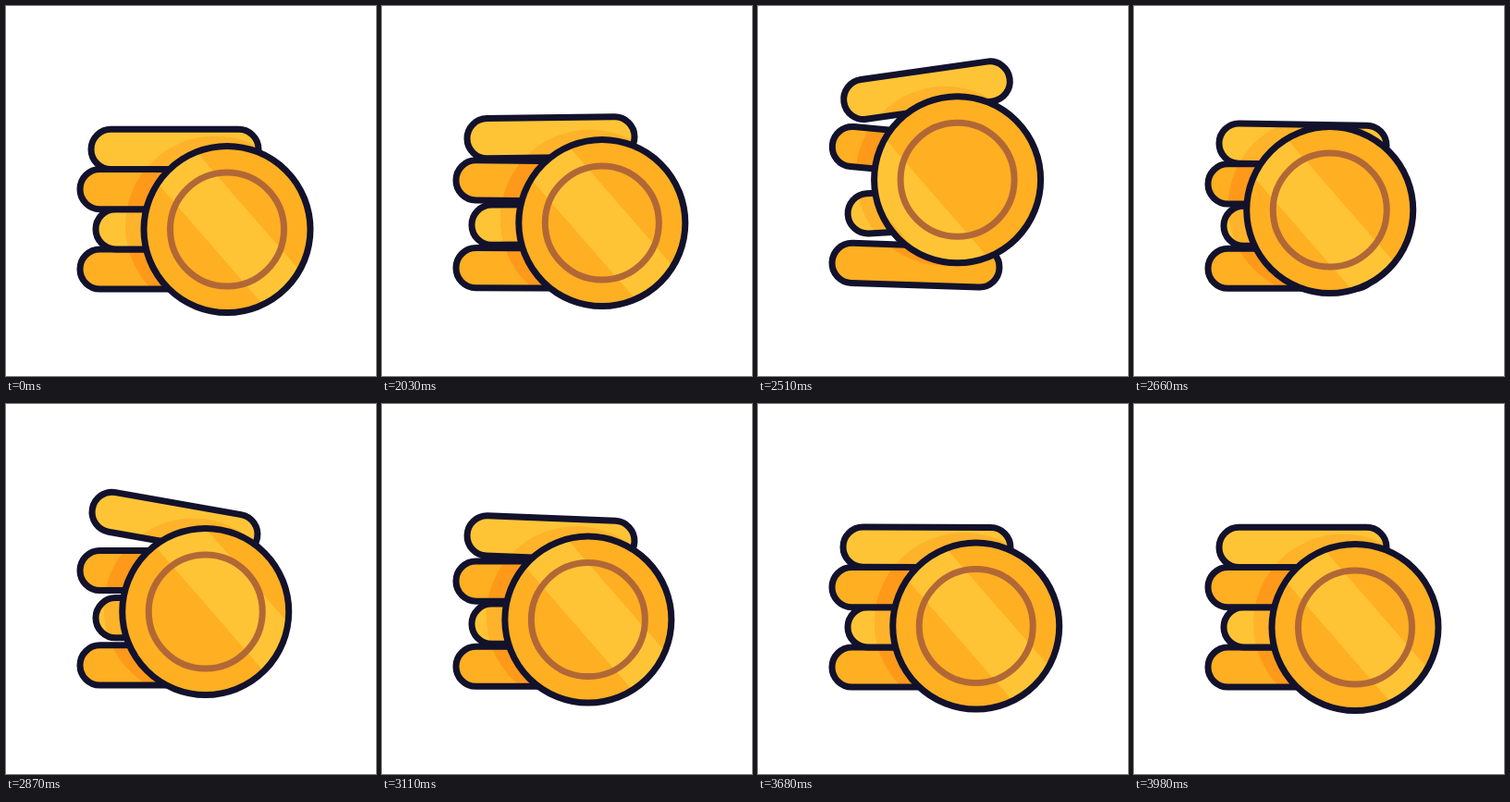
An HTML page with a canvas for the animation above (4.07 s loop, 400 by 400 pixels).

```html
<!DOCTYPE html>
<html lang="en">
<head>
<meta charset="utf-8">
<title>Bouncing coins</title>
<style>
html, body { margin: 0; width: 100%; height: 100%; overflow: hidden; background: #fff; }
canvas { display: block; width: 100%; height: 100%; }
</style>
</head>
<body>
<canvas id="stage" width="400" height="400"></canvas>
<script>
const ctx = document.getElementById('stage').getContext('2d');
const LOOP = 4070, STEP = 30, START = 2010, END = 3980;
const INK = '#12122d', LIGHT = '#ffc436', DARK = '#ffaf22', RING = '#b26836';
const LINE = 7, BAR_W = 181, BAR_H = 43.2, COIN_R = 90;
const REBOUNDS = [3165, 3600, 3930];
const RAD = Math.PI / 180;

// Four stacked bars, bottom to top: higher ones jump further and tilt more, alternating sides
const bars = [170.5, 187.5, 170.5, 182.5].map((x, i) => ({
  x, y: 284.5 - BAR_H * i,
  fill: i % 2 ? LIGHT : DARK,
  shade: i % 2 ? '#ffb32a' : '#ff991a',
  peak: 8 + 31 * i, air: 595 + i ** 3, bounce: [1, 0.26, 0.04, 0],
  swing: (i % 2 ? -1 : 1) * (4.8 + 3.8 * i),
  recoil: i === 3 ? 0.63 : 0
}));

const coin = {
  x: 239, y: 241.5, slide: 28,
  peak: 64, air: 714, bounce: [1, 0.3, 0.09, 0.03],
  swing: -78, recoil: 0.45
};

const easeOut = u => 1 - (1 - u) ** 1.5;

// Bounce number and height (0 to 1) of its parabola
function hop(part, t) {
  const land = [START, START + part.air, ...REBOUNDS];
  const n = land.findLastIndex(start => t >= start);
  if (n < 0 || n === land.length - 1) return { n: 0, arc: 0 };
  const u = (t - land[n]) / (land[n + 1] - land[n]);
  return { n, arc: 4 * u * (1 - u) };
}

function lift(part, t) {
  const { n, arc } = hop(part, t);
  return part.peak * part.bounce[n] * arc;
}

// One way during the jump, then a weakening recoil the other way
function sway(part, t) {
  const { n, arc } = hop(part, t);
  const share = n ? -part.recoil * 0.2 ** (n - 1) : 1;
  return part.swing * share * arc ** 1.5;
}

// Slides left during the jump, then eases back
function coinX(t) {
  const landing = START + coin.air;
  if (t < START) return coin.x;
  const away = t < landing
    ? easeOut((t - START) / coin.air)
    : 1 - easeOut((t - landing) / (END - landing));
  return coin.x - coin.slide * away;
}

function circle(x, y, r) {
  ctx.beginPath();
  ctx.arc(x, y, r, 0, 2 * Math.PI);
}

function fill(color) {
  ctx.fillStyle = color;
  ctx.fill();
}

function outline(color) {
  ctx.strokeStyle = color;
  ctx.lineWidth = LINE;
  ctx.stroke();
}

function pill(bar, t) {
  ctx.save();
  ctx.translate(bar.x, bar.y - lift(bar, t));
  ctx.rotate(sway(bar, t) * RAD);
  ctx.beginPath();
  ctx.roundRect(-BAR_W / 2, -BAR_H / 2, BAR_W, BAR_H, BAR_H / 2);
  ctx.restore();
}

function drawBar(bar, t, x, y) {
  pill(bar, t);
  fill(bar.fill);
  ctx.save();
  ctx.clip();
  circle(x - 13, y - 4, 97);
  fill(bar.shade);
  ctx.restore();
  pill(bar, t);
  outline(INK);
}

function drawCoin(t, x, y) {
  circle(x, y, COIN_R);
  fill(DARK);
  ctx.save();
  ctx.clip();
  ctx.translate(x, y);
  ctx.rotate(49 * RAD);
  ctx.fillStyle = LIGHT;
  ctx.fillRect(-100, -30 - sway(coin, t), 200, 54);
  ctx.restore();
  circle(x, y, 61.5);
  outline(RING);
  circle(x, y, COIN_R);
  outline(INK);
}

function draw(now) {
  const tick = Math.floor((now % LOOP + 10) / STEP) * STEP - 10;
  const t = Math.min(END, tick);
  const x = coinX(t), y = coin.y - lift(coin, t);
  ctx.fillStyle = '#fff';
  ctx.fillRect(0, 0, 400, 400);
  for (const bar of bars) drawBar(bar, t, x, y);
  drawCoin(t, x, y);
}

let begin;
function loop(now) {
  begin ??= now;
  draw(now - begin);
  requestAnimationFrame(loop);
}
requestAnimationFrame(loop);
</script>
</body>
</html>
```
